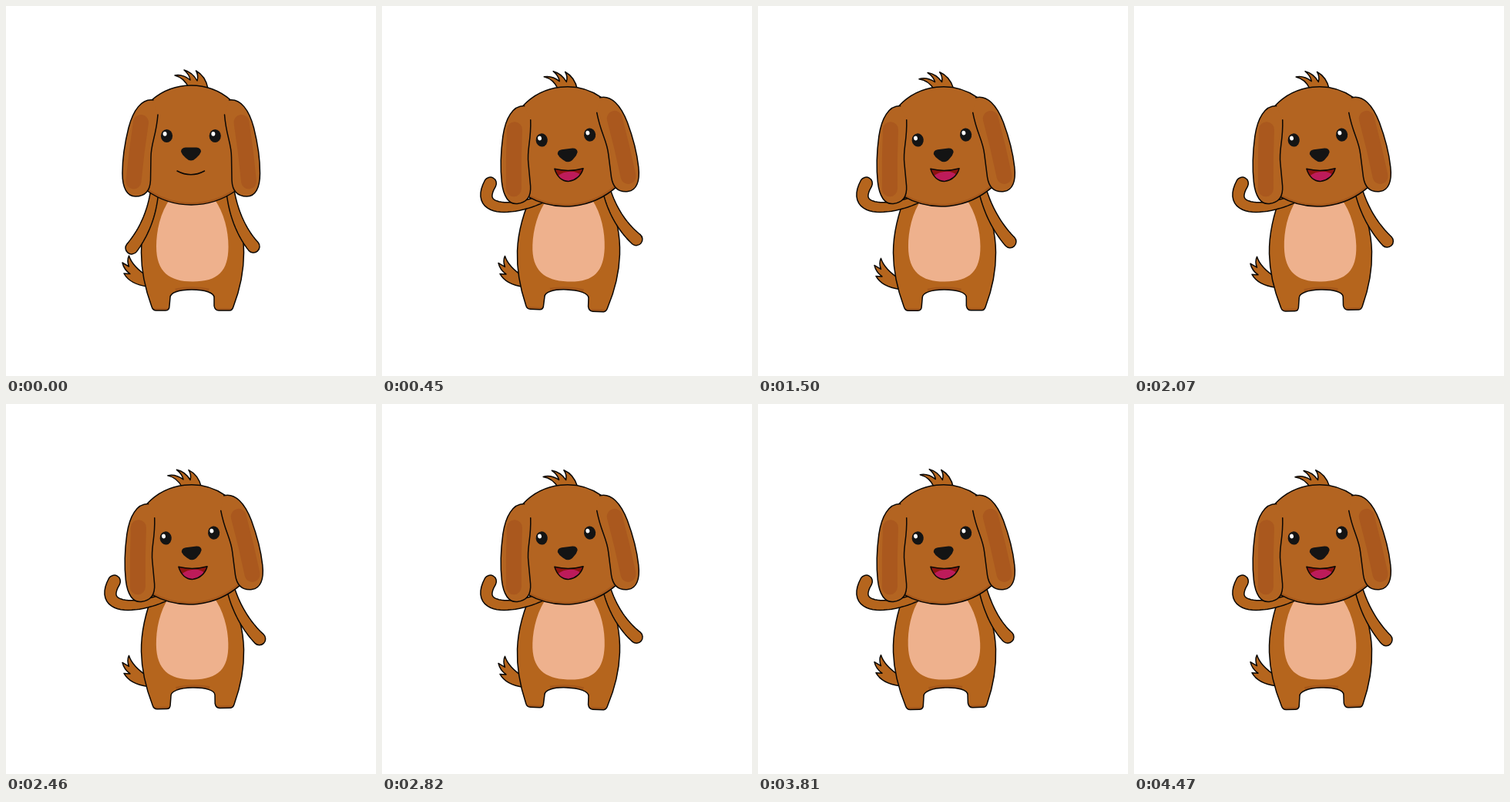
These frames come from a looping animation (480 px wide and 480 px high, 4.5 s). An HTML page:

```html
<!DOCTYPE html>
<html lang="en">
<head>
<meta charset="utf-8">
<title>Waving puppy</title>
<style>
  html, body { margin: 0; width: 100%; height: 100%; overflow: hidden; background: #fff; }
  svg { display: block; width: 100vw; height: 100vh; }
  .line { fill: none; stroke: #0b0805; stroke-width: 1.5; stroke-linecap: round; stroke-linejoin: round; }
  .fur { fill: #b5651d; }
  .face { fill: #b36421; }
  .dark { fill: #a9571c; }
  .shade { fill: none; stroke: #a6581b; stroke-width: 6; }
  .part { fill: #b5651d; }
</style>
</head>
<body>
<svg viewBox="0 0 480 480">
  <defs>
    <path id="torso" d="M194 240C183 266 175.500 295 175.500 320C175.500 348 182 371 189 390Q190.500 395 195 395H207Q212 395 212 389L213 378C213 372 224 368 241 368C258 368 270 372 270 378V389Q271 395 276 395H290Q293.500 395 295 390C303 369 308.500 348 308.500 320C308.500 295 301 266 290 240Z"/>
    <path id="skull" d="M189 122Q211 103 240.250 103T291.500 122L299 239Q272 258 240.250 258T182 239Z"/>
    <path id="flap" d="M191 122C176 120 165 135 159 158C154 178 151 199 151 217C151 236 157 247 168 247C182 247 187 238 187.500 226L188 196C188 178 195 168 197 141Z"/>
    <path id="flapLine" d="M191 122C176 120 165 135 159 158C154 178 151 199 151 217C151 236 157 247 168 247C182 247 187 238 187.500 226L188 196C188 178 195 168 197 141"/>
    <path id="lips" d="M221 207.500Q239 214 258 211C254 221 245 225.500 238 225.500C229 225 223 218 221 207.500Z"/>
    <clipPath id="inTorso"><use href="#torso"/></clipPath>
    <clipPath id="inSkull"><use href="#skull"/></clipPath>
    <clipPath id="inLips"><use href="#lips"/></clipPath>
    <g id="ear">
      <use href="#flap" class="face"/>
      <path d="M175 151Q169 190 165.500 227.500" fill="none" stroke="#aa581e" stroke-width="20" stroke-linecap="round"/>
      <use href="#flapLine" class="line"/>
    </g>
    <g id="eye">
      <ellipse rx="7.600" ry="8.600" fill="#141414"/>
      <ellipse cx="-2.400" cy="-2.700" rx="2.500" ry="2.900" fill="#fff"/>
    </g>
    <g id="lid">
      <ellipse rx="8" ry="8.500" class="dark"/>
      <path d="M-7.500 0Q0 3 7.500 0" class="line"/>
    </g>
  </defs>

  <g id="tail">
    <path class="line" style="fill:#b5651d" d="M184 364C168 362 158 356 153 347L161 347.500Q153 342 151 333Q156 336 159.500 338Q156.500 330 159.500 324Q164 338 184 351"/>
  </g>

  <g id="body">
    <use href="#torso" class="fur"/>
    <g clip-path="url(#inTorso)">
      <path class="shade" d="M188 395H213M270 395H297M220 369.500Q241 365 263 369.500"/>
    </g>
    <use href="#torso" class="line"/>
    <path fill="#eeb18d" d="M213 250C200 268 195 292 195 312C195 345 212 357.500 242 357.500C275 357.500 288.500 344 288.500 312C288.500 292 283 268 270 250Z"/>
  </g>

  <path class="line" style="fill:#b5651d" id="armR"/>
  <path class="line" style="fill:#b5651d" id="armL"/>

  <g id="head">
    <path id="hair" class="line" style="fill:#b5651d" d="M237 106Q231 93 219 90Q229 88 239 96Q238 89 231 83Q242 86 248 97Q250 90 246.500 84Q259 91 262 107"/>
    <use href="#skull" class="face"/>
    <g clip-path="url(#inSkull)"><path class="shade" d="M182 239Q208 258 240.250 258T299 239"/></g>
    <path class="line" d="M189 122Q211 103 240.250 103T291.500 122M299 239Q272 258 240.250 258T182 239"/>
    <use href="#ear"/>
    <use href="#ear" transform="translate(480.500) scale(-1 1)"/>
    <g id="open"><use href="#eye" x="208.500" y="168.500"/><use href="#eye" x="271.250" y="168.500"/></g>
    <g id="shut"><use href="#lid" x="208.500" y="168.500"/><use href="#lid" x="271.250" y="168.500"/></g>
    <path fill="#141414" d="M233 183.500H247Q253 184 253 189Q251.500 193.500 247 197Q240 204 233 197Q228.500 193.500 227 189Q227 184 233 183.500Z"/>
    <path id="smile" class="line" d="M222 214Q240 223.500 257.500 214"/>
    <g id="laugh">
      <use href="#lips" fill="#8c1410"/>
      <ellipse cx="238" cy="221.500" rx="16" ry="8.500" fill="#bd1b5a" clip-path="url(#inLips)"/>
      <use href="#lips" class="line"/>
    </g>
  </g>
</svg>
<script>
const LOOP = 4500, STEP = 30, RISE = 390;
const $ = id => document.getElementById(id);
const mix = (a, b, k) => a + (b - a) * k;
const clamp = (v, lo, hi) => Math.min(hi, Math.max(lo, v));
const ease = k => k * k * (3 - 2 * k);
// swing between -1 and 1 that peaks at the given time
const swing = (t, period, peak) => Math.cos((t - peak) / period * Math.PI * 2);
const turn = (el, deg, x, y) => el.setAttribute("transform", `rotate(${deg} ${x} ${y})`);
const show = (el, on) => el.style.display = on ? "" : "none";

// tapered limb along a cubic curve, open at the shoulder and round at the hand
function limb(id, s, a, b, e) {
  const one = [], two = [], thin = 5, thick = 8, parts = 24;
  for (let i = 0; i <= parts; i++) {
    const u = i / parts, v = 1 - u, r = mix(thin, thick, u);
    const [x, y] = [0, 1].map(n => v * v * v * s[n] + 3 * v * v * u * a[n] + 3 * v * u * u * b[n] + u * u * u * e[n]);
    const [dx, dy] = [0, 1].map(n => v * v * (a[n] - s[n]) + 2 * v * u * (b[n] - a[n]) + u * u * (e[n] - b[n]));
    const q = r / Math.hypot(dx, dy);
    one.push(`${x - dy * q} ${y + dx * q}`);
    two.unshift(`${x + dy * q} ${y - dx * q}`);
  }
  $(id).setAttribute("d", `M${one.join("L")}A${thick} ${thick} 0 0 0 ${two.join("L")}`);
}

function draw(t) {
  const k = ease(clamp(t / RISE, 0, 1));
  const at = (x0, y0, x1, y1) => [mix(x0, x1, k), mix(y0, y1, k)];

  const sway = clamp(1.3 * swing(t, 608, 4398), -1, 1);
  turn($("body"), -2 * sway * k, 242, 320);
  $("tail").setAttribute("transform", `translate(0 ${1.7 * (1 + swing(t, 440, 2820)) * k})`);

  // the waving hand travels on an arc
  const angle = mix(118.5, 204.5, k) * Math.PI / 180, reach = mix(67, 60, k);
  const hand = [195 + reach * Math.cos(angle), 255 + reach * Math.sin(angle)];
  limb("armL", at(193, 236, 212, 248), at(191, 262, 176, 266), at(182, 290, 118, 270), hand);

  const arm = swing(t, 396, 4372);
  limb("armR",
    [290.5, 236],
    at(293.5, 262, 297, 262),
    at(302.5, 290, 309 + 2 * arm, 286),
    at(321, 312, 327 + 3.5 * arm, 305.7 - 4.5 * arm * arm));

  $("head").setAttribute("transform",
    `translate(${-1.5 * k} ${2 * k}) rotate(${-6.3 * k} 239.75 168.5)`);
  turn($("hair"), (3 - 3.3 * swing(t, 430, 4490)) * k, 248, 104);

  const blink = t >= 870 && t < 990, laugh = t >= 150;
  show($("open"), !blink);
  show($("shut"), blink);
  show($("smile"), !laugh);
  show($("laugh"), laugh);
}

const start = performance.now();
function tick() {
  const t = (performance.now() - start) % LOOP;
  draw(Math.floor(t / STEP) * STEP);
  requestAnimationFrame(tick);
}
tick();
</script>
</body>
</html>
```
